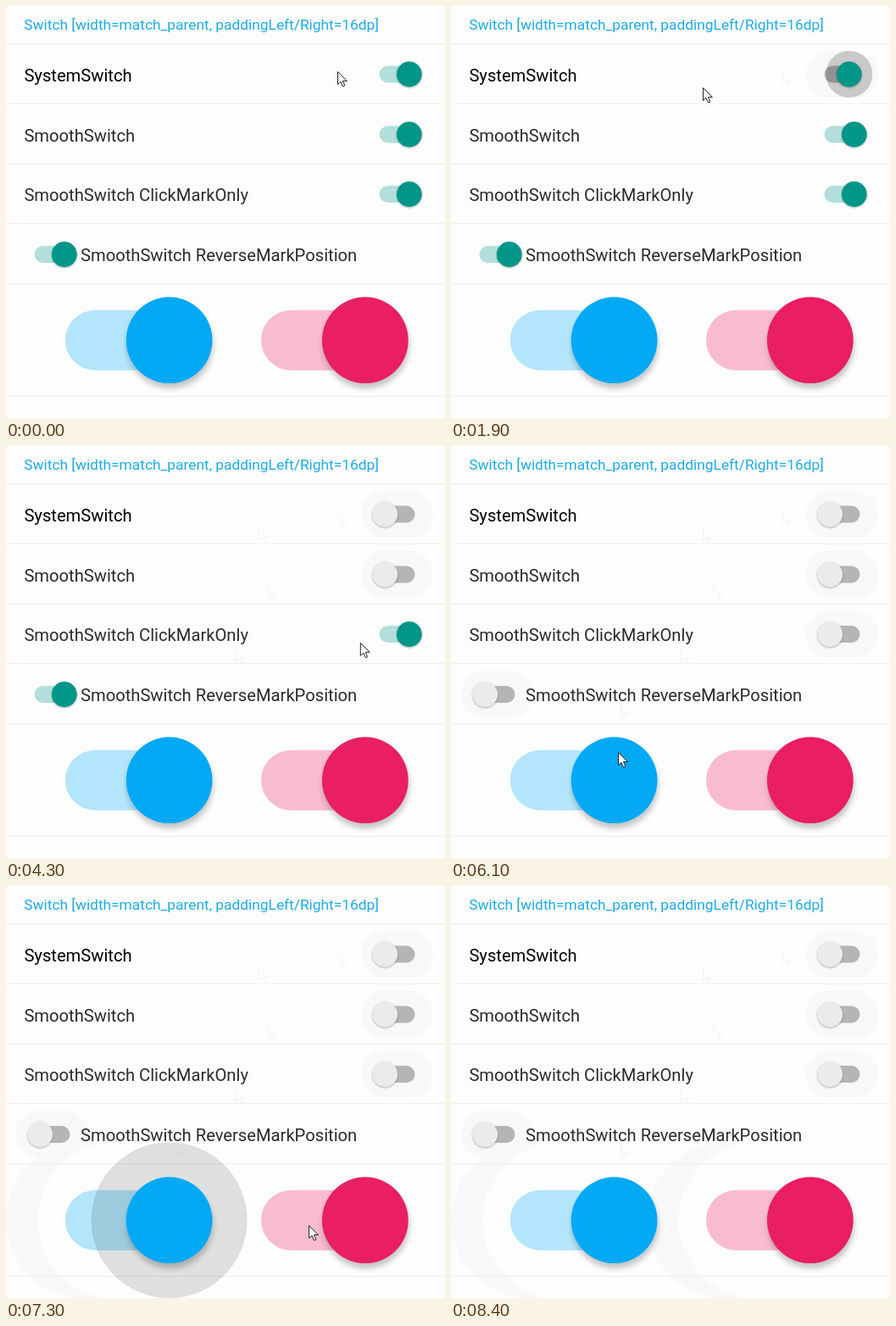
An HTML page that plays this animation: 518x486 px, repeating every 9000 ms.

```html
<!DOCTYPE html>
<html lang="en">
<head>
<meta charset="utf-8">
<title>Switches</title>
<style>
  html, body { margin: 0; width: 100%; height: 100%; overflow: hidden; background: #fdfdfd; }
  svg { display: block; }
  text { font-family: Roboto, "Open Sans", sans-serif; font-size: 20.18px; fill: #2b2b2b; }
  .title { font-size: 17.33px; fill: #1badea; }
  .small { filter: drop-shadow(0 1px 1px rgba(0, 0, 0, .3)); }
  .big { filter: drop-shadow(1px 6px 3px rgba(0, 0, 0, .22)); }
</style>
</head>
<body>
<svg width="518" height="486" viewBox="0 0 518 486">
  <g id="residue"></g>
  <path d="M0 44.5H518M0 115.5H518M0 186.5H518M0 327.5H518M0 460.5H518" stroke="#efeeee"/>
  <path d="M0 256.5H518" stroke="#f8eaea"/>
  <text class="title" x="21.2" y="27.5">Switch [width=match_parent, paddingLeft/Right=16dp]</text>
  <text x="21.4" y="88.5" style="fill:#000">SystemSwitch</text>
  <text x="21.4" y="159.5">SmoothSwitch</text>
  <text x="21.4" y="230">SmoothSwitch ClickMarkOnly</text>
  <text x="88" y="301">SmoothSwitch ReverseMarkPosition</text>
  <g id="switches"></g>
  <g id="pointer"></g>
</svg>
<script>
const LOOP = 9000, STEP = 100, TRAVEL = 300;
const BACK = '#fdfdfd', FAINT = '#f8f8f8';
const OFF = { thumb: '#ebebeb', track: '#b5b5b5' };
const TEAL = { thumb: '#009688', track: '#b2dfdb' };
const BLUE = { thumb: '#03a9f4', track: '#b3e5fc' };
const PINK = { thumb: '#e91e63', track: '#f8bbd0' };

const SMALL = { name: 'small', width: 42, height: 20, thumb: 14.9, travel: 14.3, ripple: 27.5 };
const BIG = { name: 'big', width: 145, height: 71, thumb: 50.9, travel: 50.3, ripple: 92 };

// Every switch starts on and flips with each toggle
const toggle = (at, span = 500) => ({ at, span });
const switches = [
  { x: 461.5, y: 80.5, size: SMALL, on: TEAL, toggles: [toggle(400), toggle(1100), toggle(1700)] },
  { x: 461.5, y: 151.5, size: SMALL, on: TEAL, toggles: [toggle(2300), toggle(2800), toggle(3500)] },
  { x: 461.5, y: 222, size: SMALL, on: TEAL, toggles: [toggle(4700)] },
  { x: 54.5, y: 293, size: SMALL, on: TEAL, toggles: [toggle(5500)] },
  { x: 142.3, y: 394.2, size: BIG, on: BLUE, toggles: [toggle(6100), toggle(6900)] },
  { x: 373.5, y: 394.2, size: BIG, on: PINK, toggles: [toggle(7500), toggle(8100, 300)] }
];

// Where the pointer arrives, and when
const stop = (at, x, y) => ({ at, x, y });
const stops = [
  stop(0, 391, 77), stop(300, 297, 96), stop(2200, 309, 162), stop(2800, 475, 157),
  stop(3900, 270, 239), stop(4400, 453, 230), stop(5300, 200, 303), stop(6100, 197, 361),
  stop(6600, 114, 392), stop(7400, 415, 402), stop(8000, 345, 394), stop(8400, 390, 280)
];
const ARROW = 'M.5.5V15.5L4 12.3 6.5 18 8.8 17 6.4 11.5H11.3Z';

const clamp = u => Math.min(1, Math.max(0, u));
const mix = (a, b, u) => a + (b - a) * u;
const easeInOut = u => u * u * u * (u * (6 * u - 15) + 10);
const easeOut = u => 1 - (1 - u) ** 1.5;

const circle = (x, y, r, fill, extra = '') =>
  `<circle cx="${x}" cy="${y}" r="${r}" fill="${fill}" ${extra}/>`;
const pill = (x, y, w, h, fill) =>
  `<rect x="${x - w / 2}" y="${y - h / 2}" width="${w}" height="${h}" rx="${h / 2}" fill="${fill}"/>`;
const arrow = ({ x, y }, fill, stroke) =>
  `<path d="${ARROW}" transform="translate(${x} ${y})" fill="${fill}" stroke="${stroke}"/>`;
const thumbX = (s, position) => s.x + (2 * position - 1) * s.size.travel;

// The thumb glides during the middle of a toggle while the ripple swells and fades
function stateAt(s, t) {
  const count = s.toggles.filter(g => g.at <= t).length;
  if (!count) return { position: 1, alpha: 0 };
  const { at, span } = s.toggles[count - 1];
  const u = clamp((t - at) / span);
  const moved = easeInOut(clamp((u - .2) / .6));
  return { position: count % 2 ? 1 - moved : moved, alpha: .2 * Math.sin(Math.PI * u) };
}

function drawSwitch(s, t) {
  const { position, alpha } = stateAt(s, t);
  const { name, width, height, thumb, ripple } = s.size;
  const x = thumbX(s, position);
  return pill(s.x, s.y, width, height, (position > .9 ? s.on : OFF).track) +
    circle(x, s.y, ripple, '#000', `opacity="${alpha}"`) +
    circle(x, s.y, thumb, (position > .5 ? s.on : OFF).thumb, `class="${name}"`);
}

// Faint area left behind by finished ripples
function drawResidue(s, t) {
  const [first, last] = [s.toggles[0], s.toggles.at(-1)];
  if (t < first.at + 300) return '';
  if (s.size === SMALL) return pill(s.x, s.y, 85, 56, FAINT);
  const disc = (position, fill) => circle(thumbX(s, position), s.y, s.size.ripple, fill);
  const returned = t >= last.at + .8 * last.span;
  return disc(0, FAINT) + (returned ? disc(.37, BACK) : disc(.72, FAINT));
}

function pointerAt(t) {
  const next = stops.findIndex(p => p.at > t);
  if (next < 0) return null;
  const from = stops[next - 1], to = stops[next];
  const u = easeOut(clamp(1 - (to.at - t) / TRAVEL));
  return { x: mix(from.x, to.x, u), y: mix(from.y, to.y, u) };
}

// A stop keeps a faint outline once the pointer has moved on
const drawTraces = t => stops
  .filter((p, i) => stops[i + 1]?.at - TRAVEL < t)
  .map(p => arrow(p, 'none', '#f3f3f3')).join('');

const drawAll = (draw, t) => switches.map(s => draw(s, t)).join('');
const [residueLayer, switchLayer, pointerLayer] =
  ['residue', 'switches', 'pointer'].map(id => document.getElementById(id));

function render(t) {
  const pointer = pointerAt(t);
  residueLayer.innerHTML = drawTraces(t) + drawAll(drawResidue, t);
  switchLayer.innerHTML = drawAll(drawSwitch, t);
  pointerLayer.innerHTML = pointer ? arrow(pointer, '#fff', '#222') : '';
}

const startTime = performance.now();
let shown = -1;
function tick() {
  const elapsed = (performance.now() - startTime) % LOOP;
  const t = Math.floor(elapsed / STEP) * STEP;
  if (t !== shown) render(shown = t);
  requestAnimationFrame(tick);
}
tick();
</script>
</body>
</html>
```
